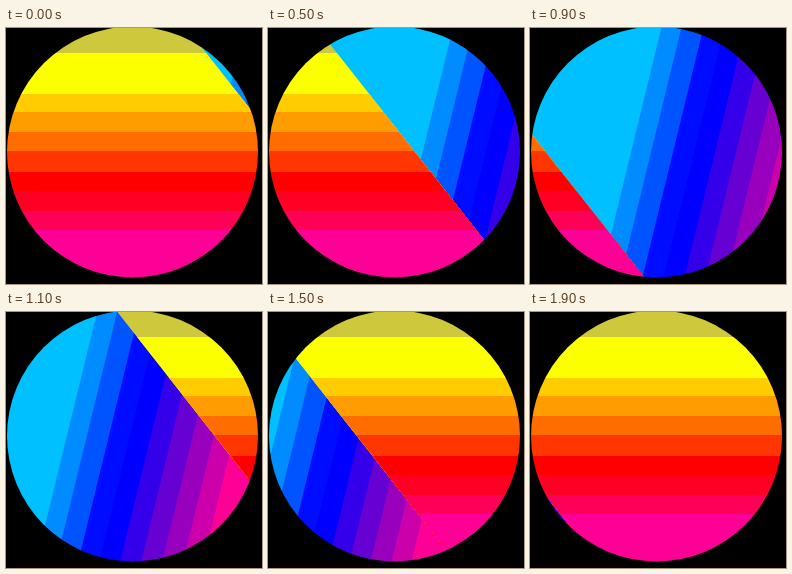
An HTML page with a canvas for the animation above (2000 ms loop, 256 by 256 pixels).

```html
<!DOCTYPE html>
<html lang="en">
<head>
<meta charset="utf-8">
<title>Sunset wipe</title>
<style>
  html, body { margin: 0; width: 100%; height: 100%; overflow: hidden; background: #000; }
  canvas { display: block; width: 256px; height: 256px; }
</style>
</head>
<body>
<canvas id="stage" width="256" height="256"></canvas>
<script>
const ctx = document.getElementById('stage').getContext('2d');
const FAR = 600, LOOP = 2000, STEP = 100;

// Each band: [start offset, colour]; it runs until the next one begins.
const sunset = [
  [-10, '#cdc83c'], [25, '#fcff00'], [66, '#ffcc00'], [84, '#ff9c00'], [104, '#ff6c00'],
  [123, '#ff3600'], [144, '#f00'], [163, '#ff0024'], [183, '#ff0058'], [202, '#ff0096']
];
const night = [
  [-FAR, '#00c0ff'], [0, '#008cff'], [20, '#0054ff'], [42, '#000cff'], [63, '#00f'],
  [84, '#3300e9'], [105, '#6600d3'], [126, '#9900be'], [147, '#cc00aa'], [167, '#ff0096']
];

// Makes x = 0 a slanted line through (x, y); slant is dx per dy.
const slantAt = (x, y, slant) => ctx.setTransform(1, 0, slant, 1, x - y * slant, 0);

function drawNight(edge) {
  slantAt(edge, 0, -0.244);
  for (const [x, colour] of night) {
    ctx.fillStyle = colour;
    ctx.fillRect(x, -10, FAR * 2, 276);
  }
  ctx.resetTransform();
}

// Shows the sunset on one side of a slanted edge that crosses y = 124 at x.
function drawSunset(x, side) {
  ctx.save();
  slantAt(x, 124, 0.787);
  ctx.beginPath();
  ctx.rect(0, -10, side * FAR, 276);
  ctx.resetTransform();
  ctx.clip();
  for (const [y, colour] of sunset) {
    ctx.fillStyle = colour;
    ctx.fillRect(0, y, 256, 266 - y);
  }
  ctx.restore();
}

function draw(now) {
  const tick = Math.floor(now % LOOP / STEP);
  // The first pose holds for two ticks; the motion catches up halfway.
  const phase = tick < 10 ? Math.max(0, tick - 1) : tick;

  ctx.globalCompositeOperation = 'source-over';
  ctx.clearRect(0, 0, 256, 256);
  drawNight(238.5 - 13.4 * phase);
  drawSunset(278 - 32.8 * phase, -1);
  drawSunset(209 - 30 * (phase - 11), 1);

  // Keep only the disc, so its rim stays free of underlying colours.
  ctx.globalCompositeOperation = 'destination-in';
  ctx.beginPath();
  ctx.arc(126.5, 124, 125.5, 0, Math.PI * 2);
  ctx.fill();
}

const start = performance.now();
function frame() {
  draw(performance.now() - start);
  requestAnimationFrame(frame);
}
frame();
</script>
</body>
</html>
```
